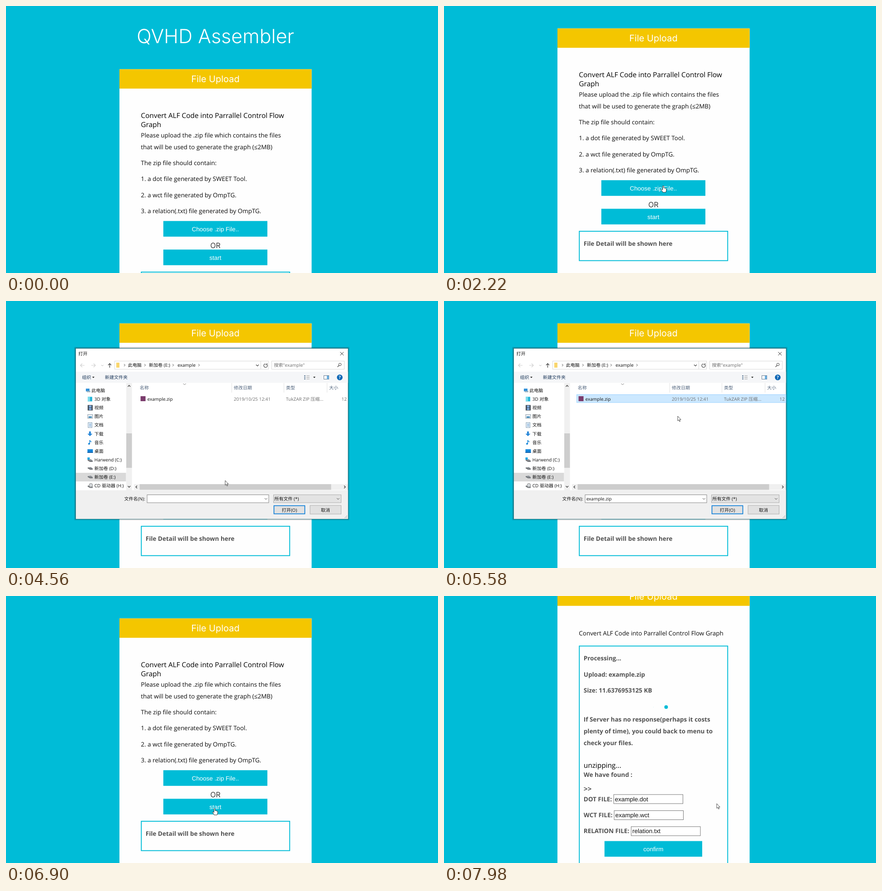
Recreate the animation shown at these times as an HTML page. Size 952x589 px, loop 8 s.

```html
<!DOCTYPE html>
<html lang="en">
<head>
<meta charset="utf-8">
<title>File Upload</title>
<style>
html, body { margin: 0; width: 100%; height: 100%; overflow: hidden; background: #00bcd7; }
svg { display: block; width: 952px; height: 589px; }
text { white-space: pre; text-rendering: geometricPrecision; }
.body { font: 13.44px "Open Sans", sans-serif; fill: #0c0c0c; }
.lead { font: 15.36px "Open Sans", sans-serif; fill: #000; }
.bold { font: 700 13.44px "Open Sans", sans-serif; fill: #505050; }
.form { font: 13.44px "Liberation Sans", Arial, sans-serif; fill: #111; }
.btn { font: 13.44px "Liberation Sans", Arial, sans-serif; fill: #fff; text-anchor: middle; }
.title { font: 300 43px Inter, sans-serif; fill: #fff; text-anchor: middle; }
.head { font: 20px Inter, sans-serif; fill: #fff; text-anchor: middle; }
.or { font: 300 16px Inter, sans-serif; fill: #000; text-anchor: middle; }
.ui { font: 10px "Open Sans", "Noto Sans CJK SC", "Noto Sans CJK", sans-serif; fill: #111; }
.mid { text-anchor: middle; }
.grey { fill: #6d6d6d; }
.navy { fill: #1e395b; }
.col { fill: #4c607a; }
</style>
</head>
<body>
<svg id="stage" viewBox="0 0 952 589"></svg>
<script>
const TEAL = '#00bcd7', LOOP = 8000, STEP = 60;
const stage = document.getElementById('stage');

const text = (cls, x, y, s) => `<text class="${cls}" x="${x}" y="${y}">${s}</text>`;
const rect = (x, y, w, h, fill, more = '') =>
  `<rect x="${x}" y="${y}" width="${w}" height="${h}" fill="${fill}" ${more}/>`;
const line = (d, color, w = 1) => `<path d="${d}" fill="none" stroke="${color}" stroke-width="${w}"/>`;
const group = (id, s, more = '') => `<g id="${id}" ${more}>${s}</g>`;
const button = (x, y, w, label) =>
  rect(x, y, w, 34.5, TEAL) + text('btn', x + w / 2, y + 22.2, label);
const frame = (x, y, w, h) => rect(x, y, w, h, 'none', `stroke="${TEAL}" stroke-width="1.9"`);
const list = (cls, x, rows) => rows.map(([y, s]) => text(cls, x, y, s)).join('');

function pageShell() {
  return text('title', 461.5, 81.5, 'QVHD Assembler') +
    rect(250, 139.5, 423.5, 900, '#fefefe') +
    rect(250, 139.5, 423.5, 42.7, '#f4c600') +
    text('head', 461.5, 168, 'File Upload');
}

function uploadForm() {
  return list('lead', 297.3, [
      [246.7, 'Convert ALF Code into Parrallel Control Flow'],
      [267.2, 'Graph']]) +
    list('body', 297.3, [
      [290, 'Please upload the .zip file which contains the files'],
      [315.5, 'that will be used to generate the graph (≤2MB)'],
      [351, 'The zip file should contain:'],
      [386.3, '1. a dot file generated by SWEET Tool.'],
      [421.8, '2. a wct file generated by OmpTG.'],
      [457, '3. a relation(.txt) file generated by OmpTG.']]) +
    button(346.7, 474.3, 229.3, 'Choose .zip File..') +
    text('or', 461.5, 533.8, 'OR') +
    button(346.7, 537.3, 229.3, 'start') +
    frame(298.2, 586.9, 327, 64.8) +
    text('bold', 307.8, 619.3, 'File Detail will be shown here');
}

function resultForm() {
  const field = (label, value, x, y) =>
    text('bold', 307.8, y, label) +
    rect(x, y - 14.5, 152.5, 20, '#fff', 'stroke="#767676"') +
    text('form', x + 2.6, y, value);
  return text('body', 297.3, 87, 'Convert ALF Code into Parrallel Control Flow Graph') +
    frame(298.2, 110.4, 327, 700) +
    list('bold', 307.8, [
      [142.3, 'Processing...'],
      [178, 'Upload: example.zip'],
      [213.3, 'Size: 11.6376953125 KB'],
      [277.3, 'If Server has no response(perhaps it costs'],
      [303, 'plenty of time), you could back to menu to'],
      [328.8, 'check your files.'],
      [399, 'We have found :']]) +
    [0, 1, 2].map(i => `<circle class="dot" cx="${433.5 + 28 * i}" cy="245" fill="${TEAL}"/>`).join('') +
    list('lead', 307.8, [[378.5, 'unzipping...'], [431, '&gt;&gt;']]) +
    field('DOT FILE:', 'example.dot', 374, 452.5) +
    field('WCT FILE:', 'example.wct', 375, 488) +
    field('RELATION FILE:', 'relation.txt', 412.5, 523.3) +
    button(353.7, 540.6, 215.3, 'confirm');
}

function sidebar() {
  const drive = y => `<path d="M180 ${y - 2}l7-1 4 3v3h-6l-5-3z" fill="#8b9096"/>` +
    line(`M180 ${y - 1}l5 2.5h6`, '#444', .7);
  const icons = [
    y => rect(176, y - 4, 8, 6, '#2f8fd8') + rect(178, y + 1, 8, 3, '#9bb4c4'),
    y => rect(180, y - 5, 10, 10, '#25b5d8') + rect(180, y - 5, 5, 10, '#7edcee'),
    y => rect(180, y - 6, 11, 12, '#3c4650') + rect(182.5, y - 5, 6, 4.5, '#7da7d9') + rect(182.5, y + .5, 6, 4.5, '#7da7d9'),
    y => rect(180, y - 4, 11, 8, '#eef3f7', 'stroke="#8796a3"') + rect(182, y, 7, 3, '#3a86b8'),
    y => rect(181, y - 5.5, 8.5, 11, '#f8fbff', 'stroke="#7796b0"') + line(`M183 ${y - 2.5}h5m-5 2.5h5m-5 2.5h5`, '#4a8cc7'),
    y => `<path d="M183 ${y - 5}h4v5h3.5l-5.500 5.500-5.500-5.500h3.500z" fill="#2b88d8"/>`,
    y => line(`M184.500 ${y + 3}v-8q1 3 4 4`, '#1585d8', 1.5) + `<circle cx="183" cy="${y + 3}" r="2" fill="#1585d8"/>`,
    y => rect(179.500, y - 4, 12, 8, '#1687dc') + rect(179.5, y + 2, 12, 2, '#0a5ca8'),
    y => drive(y + 2) + rect(179.5, y - 5, 5, 5, '#19a2e0'),
    drive, drive,
    y => drive(y + 2) + `<circle cx="187" cy="${y - 1}" r="4" fill="#d4d8db" stroke="#888"/>`
  ];
  const names = ['此电脑', '3D 对象', '视频', '图片', '文档', '下载', '音乐', '桌面',
    'Harwend (C:)', '新加卷 (D:)', '新加卷 (E:)', 'CD 驱动器 (H:)'];
  return rect(154, 379, 110.5, 19, '#d9d9d9') + names.map((name, i) => {
    const y = 197.3 + 19.1 * i;
    return icons[i](y) + text('ui', i ? 194.8 : 188.3, y + 3.7, name);
  }).join('') +
    rect(265, 181, 12.5, 237, '#f0f0f0') + rect(265, 292, 12.5, 76, '#cdcdcd') +
    line('M268.500 189l2.800-3 2.800 3M268.500 408l2.800 3 2.800-3', '#444', 1.3);
}

function dialog() {
  const chevrons = [260, 305, 367, 424].map(x => `M${x} 139l2.500 2.500-2.500 2.500`).join('');
  const shadow = [6, 4, 2].map(d =>
    rect(153 - d / 2, 104 - d / 2, 601 + d, 377 + d, '#000', 'rx="2" opacity=".09"')).join('');
  return shadow +
    rect(153.5, 104.5, 600.5, 376.5, '#fff', 'stroke="#28707c"') +
    text('ui', 159.5, 120, '打开') + line('M736.500 112.500l7.500 7.500m0-7.500l-7.500 7.500', '#222') +
    // address row
    line('M173 142h-9m4-4l-4 4 4 4M188 142h9m-4-4l4 4-4 4', '#cfcfcf', 1.2) +
    line('M210 141l2.300 2.300 2.300-2.300', '#b5b5b5') +
    line('M228.500 147v-9m-3.500 3.500l3.500-3.500 3.500 3.500', '#444', 1.3) +
    rect(239.5, 132.5, 339, 18, '#fff', 'stroke="#d9d9d9"') + line('M561.500 133v17', '#d9d9d9') +
    rect(243, 136, 7, 11, '#f9d66f') + line(chevrons, '#444') +
    text('ui', 268.7, 145.3, '此电脑') + text('ui', 315, 145.3, '新加卷 (E:)') + text('ui', 378, 145.3, 'example') +
    line('M551 140.500l3 3 3-3', '#444', 1.2) +
    line('M572 138.500a4 4 0 1 0 3.500 2m-.500-3.500v3.500h-3.500', '#444', 1.2) +
    rect(585.5, 132.5, 160, 18, '#fff', 'stroke="#d9d9d9"') + text('ui grey', 590.5, 145.3, '搜索"example"') +
    '<circle cx="736" cy="140" r="2.800" fill="none" stroke="#444"/>' + line('M734 142l-3.500 3.500', '#444', 1.3) +
    // toolbar
    rect(154, 156, 599.5, 24.500, '#f5f6f8') +
    text('ui navy', 167.5, 172, '组织') + '<path d="M190 167h5l-2.500 3z" fill="#222"/>' +
    text('ui navy', 218, 172, '新建文件夹') +
    line('M657 165h3m-3 3.500h3m-3 3.500h3', '#68829b', 1.8) + line('M662 165h7m-7 3.500h7m-7 3.500h7', '#999') +
    '<path d="M677 167h5l-2.500 3z" fill="#222"/>' +
    rect(700.5, 164.5, 11, 8, '#fff', 'stroke="#6a7f94"') + rect(707, 165, 4.5, 7.500, '#6aaee0') +
    '<circle cx="735.500" cy="168.500" r="6.300" fill="#0b66b5"/>' +
    '<text class="ui mid" x="735.500" y="172.300" style="fill:#fff;font-weight:700">?</text>' +
    sidebar() +
    // file list
    line('M497.500 181v21M612.500 181v21M707.500 181v21', '#e2e2e2') + line('M390.500 182l3 3 3-3', '#777') +
    text('ui col', 294.7, 195, '名称') + text('ui col', 502, 195, '修改日期') +
    text('ui col', 617, 195, '类型') + text('ui col', 712, 195, '大小') +
    rect(292.5, 206.5, 461, 17.500, 'none', 'id="row"') +
    rect(296.5, 210, 11, 11, '#7a3c6c') + text('ui', 311.5, 219.7, 'example.zip') +
    text('ui grey', 502, 219.7, '2019/10/25 12:41') + text('ui grey', 617, 219.7, 'TukZAR ZIP 压缩...') +
    text('ui grey', 739.5, 219.7, '12') +
    rect(282, 404, 471, 12.500, '#f0f0f0') + rect(294.5, 404, 422, 12.500, '#cdcdcd') +
    line('M289 407.500l-3 2.800 3 2.800M745 407.500l3 2.800-3 2.800', '#333', 1.3) +
    // lower panel
    rect(154, 417.5, 599.5, 63, '#f0f0f0') +
    text('ui', 260.5, 440.2, '文件名(N):') +
    rect(311, 427.5, 268, 17.500, '#fff', 'stroke="#858585"') + line('M570 435l2.800 2.800 2.800-2.800', '#444') +
    group('name', text('ui', 313.7, 440.2, 'example.zip')) +
    rect(589.5, 427.5, 149, 17.500, '#e3e3e3', 'stroke="#adadad"') + text('ui', 591.500, 440.2, '所有文件 (*)') +
    line('M729 435l2.800 2.800 2.800-2.800', '#444') +
    rect(590.5, 451.5, 68, 18, '#e1e1e1', 'id="open" stroke="#0078d7" stroke-width="1.600"') +
    text('ui mid', 624.5, 464.5, '打开(O)') +
    rect(670, 451, 68.5, 19, '#e1e1e1', 'stroke="#adadad"') + text('ui mid', 704, 464.5, '取消') +
    line('M746 479l6-6m-3 6l3-3', '#aaa');
}

const arrow = '<path d="M0 0V10.300L2.300 8.300 4 12 5.600 11.300 4 7.700H7.200Z" fill="#fff" stroke="#222" stroke-width=".800"/>';
const hand = '<path d="M-1.200 1.200Q0-.500 1.200 1.200V5.500Q2.500 4.600 3.400 6 4.600 5.200 5.400 6.600 7 6.200 7 8V11Q6.500 13 5.700 15H-.800Q-2-12-4.600 9-4.200 7.500-2.400 8.500L-1.200 9.600Z" fill="#fff" stroke="#222" stroke-width=".900"/>'
  .replace('Q-2-12-4.600 9-4.200 7.500-2.400 8.500', 'Q-2.200 12-4.400 9.400-4.200 7.600-2.600 8.400');

stage.innerHTML = rect(0, 0, 952, 589, TEAL) +
  group('page', pageShell() + group('upload', uploadForm()) +
    group('result', resultForm(), 'transform="translate(0 160.5)"')) +
  group('dialog', dialog()) +
  group('cursor', group('arrow', arrow) + group('hand', hand));

const $ = id => document.getElementById(id);
const parts = {};
for (const id of ['page', 'upload', 'result', 'dialog', 'row', 'name', 'open', 'cursor', 'arrow', 'hand']) parts[id] = $(id);
const dots = [...document.querySelectorAll('.dot')];

const clamp = v => Math.min(1, Math.max(0, v));
const smooth = v => { v = clamp(v); return v * v * (3 - 2 * v); };
const show = (el, on) => el.setAttribute('display', on ? 'inline' : 'none');

// time, x, y of the pointer tip
const path = [
  [60, 914, 82], [180, 790, 150], [300, 660, 240], [420, 590, 307], [540, 533, 367], [660, 457, 490],
  [1140, 457, 490], [1500, 475, 465], [1920, 475, 465], [2220, 483, 396],
  [5040, 483, 396], [5220, 494, 300], [5340, 502, 224], [5520, 502, 224], [5580, 515, 254],
  [5640, 546, 315], [5760, 625, 459], [5820, 634, 502], [5880, 634, 502], [6120, 627, 459],
  [6720, 627, 459], [6780, 614, 460], [6900, 459.5, 468], [7200, 459.5, 468], [7500, 601, 458], [8000, 601, 458]
];

function pointer(t) {
  const i = Math.max(1, path.findIndex(k => k[0] >= t));
  const [a, b] = [path[i - 1], path[i]];
  const p = clamp((t - a[0]) / (b[0] - a[0]));
  return [a[1] + (b[1] - a[1]) * p, a[2] + (b[2] - a[2]) * p];
}

function scrollAt(t) {
  if (t < 1140) return 0;
  if (t < 7260) return 90 - 38 * (1 - clamp((t - 1140) / 360)) ** 2;
  return 160.5 * smooth((t - 7460) / 500);
}

function bounce(phase) {
  phase = (phase % 1 + 1) % 1;
  return phase < .4 ? smooth(phase / .4) : 1 - smooth((phase - .4) / .4);
}

function draw(time) {
  const t = Math.floor(time / STEP) * STEP;
  const scroll = scrollAt(t), [x, y] = pointer(t), loaded = t >= 7260;
  parts.page.setAttribute('transform', `translate(0 ${-scroll})`);
  show(parts.upload, !loaded);
  show(parts.result, loaded);
  dots.forEach((dot, i) =>
    dot.setAttribute('r', 12 * bounce(.646 + (t - 7980) / 1400 + (2 - i) * .114)));

  const seen = smooth((t - 4320) / 240) * (1 - smooth((t - 6360) / 240));
  const size = .92 + .08 * seen;
  show(parts.dialog, seen > 0);
  parts.dialog.setAttribute('opacity', seen);
  parts.dialog.setAttribute('transform', `translate(453.5 292.5) scale(${size}) translate(-453.5 -292.5)`);

  const picked = t >= 5460, overRow = y > 206 && y < 225;
  parts.row.setAttribute('fill', picked ? '#cce8ff' : overRow ? '#e5f3ff' : 'none');
  parts.row.setAttribute('stroke', picked ? '#99d1ff' : 'none');
  show(parts.name, picked);
  const overOpen = x > 590 && x < 659 && y > 451 && y < 470;
  parts.open.setAttribute('fill', overOpen ? '#e5f1fb' : '#e1e1e1');

  const modal = t >= 4320 && t < 6720;
  const onButton = !loaded && !modal && x > 347 && x < 576 &&
    [474.3, 537.3].some(top => y + scroll > top && y + scroll < top + 34.5);
  show(parts.cursor, t >= 60);
  parts.cursor.setAttribute('transform', `translate(${x} ${y})`);
  show(parts.hand, onButton);
  show(parts.arrow, !onButton);
}

function tick() {
  draw(performance.now() % LOOP);
  requestAnimationFrame(tick);
}
tick();
</script>
</body>
</html>
```
